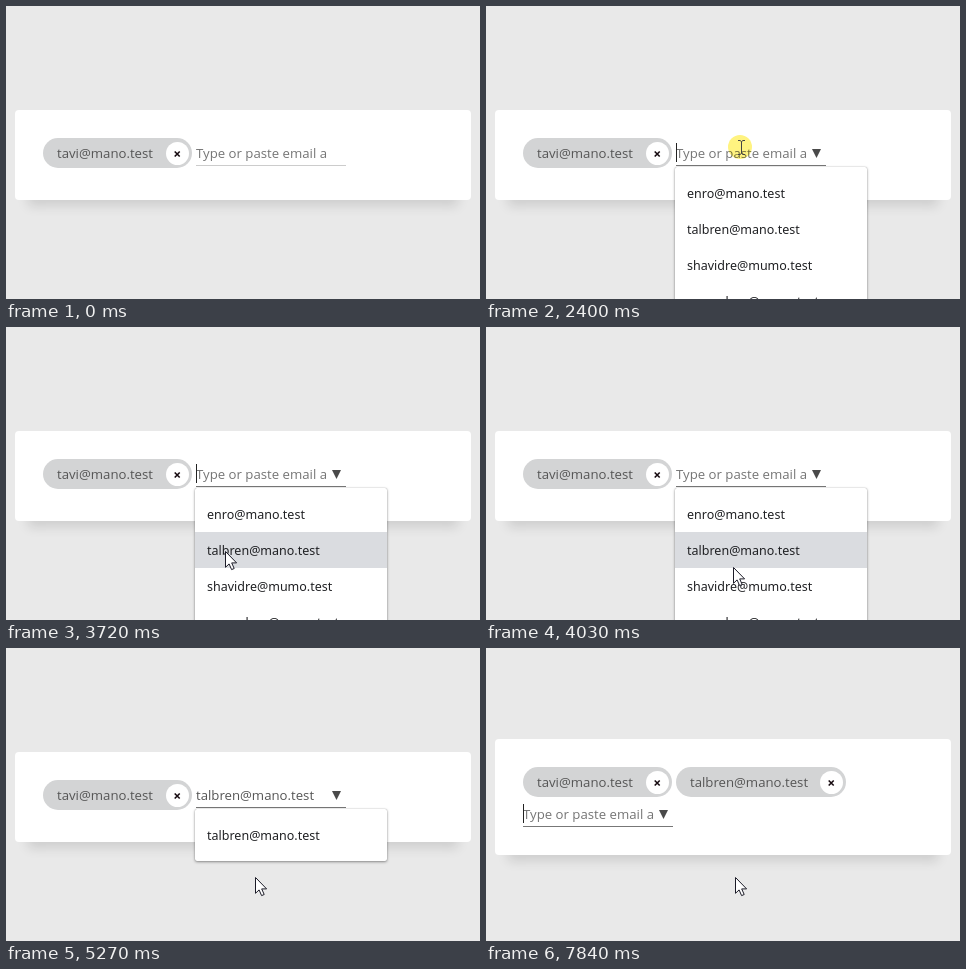
An HTML page that plays this animation: 474x293 px, repeating every 8 s.

```html
<!DOCTYPE html>
<html lang="en">
<head>
<meta charset="utf-8">
<title>Email chips input</title>
<style>
  html, body { margin: 0; width: 100%; height: 100%; overflow: hidden; background: #e9e9e9; }
  body { position: relative; font: 13.2px/30px "Open Sans", "Noto Sans", sans-serif; color: #555; white-space: nowrap; }
  div, i, svg { position: absolute; box-sizing: border-box; }
  #card { left: 9px; width: 456px; background: #fff; border-radius: 4px; box-shadow: 0 19px 11px -13px rgba(0,0,0,.12); }
  .chip { height: 30px; padding-left: 14px; border-radius: 15px; background: #d3d4d5; }
  .chip svg { right: 3px; top: 4px; }
  #field { width: 150px; height: 30px; }
  #line { left: 0; top: 27px; width: 150px; height: 1px; }
  #caret { top: 5px; width: 1px; height: 19px; background: #222; }
  #arrow { left: 136px; top: 11px; width: 9px; height: 9px; background: #4a4a4a; clip-path: polygon(0 0, 100% 0, 50% 100%); }
  #list { left: 189px; top: 161px; width: 192px; padding: 8px 0; background: #fff; border-radius: 2px;
    box-shadow: 0 0 1px rgba(0,0,0,.35), 0 1px 3px rgba(0,0,0,.4);
    font-family: "Noto Sans", "Open Sans", sans-serif; font-size: 12.5px; font-weight: 500; color: #202124; }
  #list p { margin: 0; height: 36px; line-height: 37px; padding-left: 12px; }
  #click { width: 24px; height: 24px; margin: -12px; border-radius: 50%; background: #fff380; mix-blend-mode: multiply; }
  #pointer { left: 0; top: 0; overflow: visible; }
</style>
</head>
<body>
<div id="card"></div>
<div class="chip" style="left:37px;width:149px">tavi@mano.test</div>
<div class="chip" style="left:190px;width:170px">talbren@mano.test</div>
<div id="field"><span id="text"></span><i id="line"></i><i id="caret"></i><i id="arrow"></i></div>
<div id="list"><p>enro@mano.test</p><p>talbren@mano.test</p><p>shavidre@mumo.test</p><p>nomadren@mano.test</p></div>
<div id="click"></div>
<svg id="pointer" width="20" height="20">
  <path id="hand" d="M.5 .5V16.3L4.1 12.9L6.6 18.6L9.2 17.5L6.7 11.9H11.6Z" fill="#fff" stroke="#1c1c28"/>
  <path id="beam" d="M-3 -6.5H-1L.5 -5.5L2 -6.5H4M.5 -5.5V6.5M-3 7.5H-1L.5 6.5L2 7.5H4" fill="none" stroke="#444"/>
</svg>
<script>
const LOOP = 8000, STEP = 76.7;
const $ = id => document.getElementById(id);
const chips = [...document.querySelectorAll('.chip')];
const rows = [...document.querySelectorAll('#list p')];
const show = (el, on) => el.style.display = on ? '' : 'none';
const place = (el, x, y) => { el.style.left = x + 'px'; el.style.top = y + 'px'; };

for (const chip of chips) chip.insertAdjacentHTML('beforeend',
  '<svg width="23" height="23"><circle cx="11.5" cy="11.5" r="11.5" fill="#fff"/>' +
  '<path d="M8.7 9.5l5 5m0 -5l-5 5" stroke="#160a10" stroke-width="1.6"/></svg>');

// Each move: start time, then [step, x, y] points joined by straight lines.
const moves = [
  [460, [0, 329, 246], [3, 288, 206], [6, 252, 171], [9, 237, 155]],
  [1470, [0, 234, 124], [1, 236, 120]],
  [1770, [0, 237, 124], [3, 254, 142]],
  [2230, [0, 255, 141]],
  [3650, [0, 236, 190], [1, 219, 224], [2, 221, 229], [5, 247, 240], [6, 251, 245], [7, 252, 243], [9, 249, 229]]
];

function pointerAt(t) {
  const move = moves.findLast(m => t >= m[0]);
  if (!move) return null;
  const [start, ...points] = move;
  const step = Math.floor((t - start) / STEP + .1);
  const next = points.findIndex(p => p[0] > step);
  if (next < 0) return points.at(-1).slice(1);
  const a = points[next - 1], b = points[next];
  const k = (step - a[0]) / (b[0] - a[0]);
  return [1, 2].map(i => Math.round(a[i] + (b[i] - a[i]) * k));
}

const within = (t, ...spans) => spans.some(([from, to]) => t >= from && t < to);

function draw(t) {
  const focused = t >= 2400, chosen = within(t, [4740, 5730]), added = t >= 5730;
  const open = within(t, [2400, 5730]);
  const pos = pointerAt(t);
  const overField = !!pos && pos[0] >= 190 && pos[0] < 340 && pos[1] >= 135 && pos[1] < 160 && !added;

  $('card').style.top = (added ? 91 : 104) + 'px';
  $('card').style.height = (added ? 116 : 90) + 'px';
  chips.forEach(chip => chip.style.top = (added ? 119 : 132) + 'px');
  show(chips[1], added);

  place($('field'), added ? 37 : 190, added ? 151 : 132);
  $('text').textContent = chosen ? 'talbren@mano.test' : 'Type or paste email a';
  $('text').style.color = chosen ? '#555' : '#757575';
  $('line').style.background = focused ? '#777' : '#ccc';
  show($('arrow'), focused || overField);
  show($('caret'), within(t, [2400, 2950], [3420, 3960], [4490, 5270], [5730, 6280], [6830, 7290], [7840, LOOP]));
  $('caret').style.left = (chosen ? $('text').offsetWidth : 0) + 'px';

  show($('list'), open);
  rows.forEach((row, i) => {
    show(row, !chosen || i === 1);
    const top = 169 + 36 * i;
    const hover = open && !chosen && pos[1] >= top && pos[1] < top + 36;
    row.style.background = hover ? '#dadce0' : '';
  });

  show($('pointer'), pos);
  show($('click'), within(t, [2400, 2470], [4660, 4740]));
  if (!pos) return;
  show($('hand'), !overField);
  show($('beam'), overField);
  place($('pointer'), ...pos);
  place($('click'), pos[0] - 1, pos[1]);
}

function frame() {
  draw(performance.now() % LOOP);
  requestAnimationFrame(frame);
}
frame();
</script>
</body>
</html>
```
